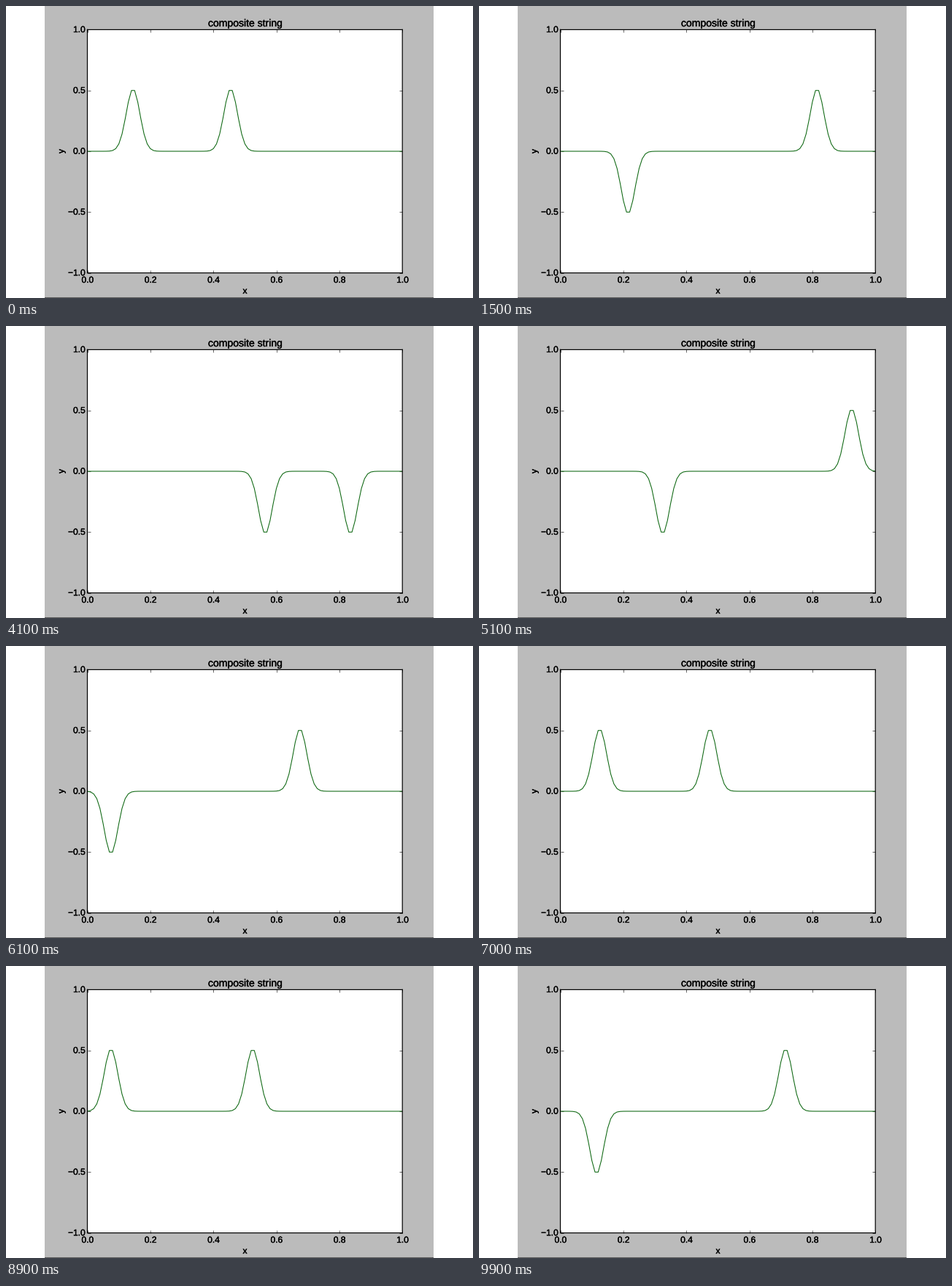
A matplotlib script for the animation above (10000 ms loop, 640 px wide and 400 px high).

```python
import numpy as np
import matplotlib.pyplot as plt
from matplotlib.animation import FuncAnimation
from matplotlib.patches import Rectangle
from matplotlib.patheffects import withStroke

W, H, DPI = 640, 400, 100
FRAMES, INTERVAL = 100, 100
PX = 72 / DPI  # points per pixel

plt.rcParams.update({
    "font.family": "Liberation Sans",
    "text.hinting": "none",
    "path.snap": False,
})

LEFT, RIGHT, TOP, BOTTOM = 111.5, 543.2, 32.4, 365.6


def solve_string(steps, n=101):
    """Leapfrog wave equation, Courant number 1, both ends fixed."""
    x = np.linspace(0, 1, n)
    u = np.zeros((steps, n))
    u[0, 1:-1] = np.exp(-1000 * (x[1:-1] - 0.3) ** 2)
    u[1] = u[0]
    for t in range(1, steps - 1):
        u[t + 1, 1:-1] = u[t, 2:] + u[t, :-2] - u[t - 1, 1:-1]
    return x, u


x, u = solve_string(260)

# Playback pace: the solver step on screen at a few animation frames.
KEY_FRAMES = [0, 15, 30, 41, 61, 80, 99]
KEY_STEPS = [16, 52, 87, 114, 163, 205, 242]


def step_at(frame):
    return int(round(np.interp(frame, KEY_FRAMES, KEY_STEPS)))


fig = plt.figure(figsize=(W / DPI, H / DPI), dpi=DPI, facecolor="white")

stage = fig.add_axes([0, 0, 1, 1])
stage.set(xlim=(0, W), ylim=(H, 0))
stage.axis("off")
stage.add_patch(Rectangle((53, 0), 533, H, fc="#bbbbbb", ec="none"))
stage.add_patch(Rectangle((53, 399), 533, 1, fc="#5c5c5c", ec="none"))

heavier = [withStroke(linewidth=0.35 * PX, foreground="black")]


def label(px, py, text, size=12, ha="center", va="baseline", **kw):
    stage.text(px, py, text, fontsize=size * PX, ha=ha, va=va,
               color="black", path_effects=heavier, **kw)


label(327.9, 28, "composite string", size=14)
label(327.5, 394, "x")
label(76.2, 199, "y", va="center", rotation=90)
for v in np.linspace(0, 1, 6):
    label(LEFT + v * (RIGHT - LEFT) + 0.3, 379, f"{v:.1f}")
for v in np.linspace(-1, 1, 5):
    py = BOTTOM - (v + 1) / 2 * (BOTTOM - TOP)
    label(108.7, py + 3.6, f"{v:.1f}".replace("-", "\u2212"), ha="right")

ax = fig.add_axes([LEFT / W, 1 - BOTTOM / H,
                   (RIGHT - LEFT) / W, (BOTTOM - TOP) / H])
ax.set(xlim=(0, 1), ylim=(-1, 1),
       xticks=np.linspace(0, 1, 6), yticks=np.linspace(-1, 1, 5))
ax.tick_params(direction="in", top=True, right=True, length=4 * PX,
               width=0.6 * PX, labelbottom=False, labelleft=False)
for spine in ax.spines.values():
    spine.set_linewidth(1.2 * PX)

line, = ax.plot(x, u[step_at(0)], color="#0b660f", lw=1.05 * PX)


def draw(frame):
    line.set_ydata(u[step_at(frame)])
    return line,


anim = FuncAnimation(fig, draw, frames=FRAMES, interval=INTERVAL,
                     repeat=True, repeat_delay=0, blit=False)
plt.show()
```
